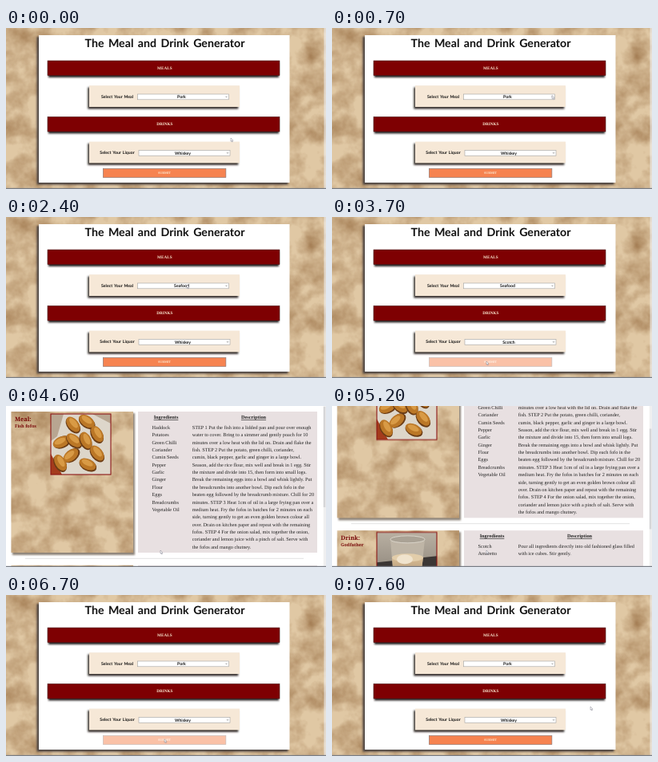
An HTML page for the animation above (8 s loop, 400 px wide and 202 px high).

```html
<!DOCTYPE html>
<html lang="en">
<head>
<meta charset="utf-8">
<title>The Meal and Drink Generator</title>
<style>
html, body { margin: 0; width: 100%; height: 100%; overflow: hidden; background: #fff; }
svg { display: block; width: 100vw; height: 100vh; }
text { text-rendering: geometricPrecision; }
.comic { font: bold 5.2px "Comic Sans MS", Lato, sans-serif; fill: #111; word-spacing: .8px; }
.title { font-size: 14.2px; word-spacing: 2px; }
.serif { font: 6.25px "Liberation Serif", serif; fill: #222; }
.head { font-weight: bold; font-size: 6.3px; text-decoration: underline; }
.bar { font-weight: bold; font-size: 5.2px; fill: #fbead2; }
.slab { font: 900 7.4px "Noto Serif", serif; fill: #780808; }
.small { font-size: 5.5px; }
.mid { text-anchor: middle; }

/* One 8 s timeline shared by every part */
.a { animation: 8s step-end infinite; }
#home { animation-name: home; }
#result { animation-name: result; }
.pick1 { animation-name: pick1; }
.pick2 { animation-name: pick2; }
.was1 { animation-name: was1; }
.was2 { animation-name: was2; }
#submit { animation-name: hover; }
#page { animation: scroll 8s linear infinite; }
#thumb { animation: thumb 8s linear infinite; }
#cursor { animation: move 8s ease-in-out infinite; }

@keyframes home { 0%, 82.5% { visibility: visible } 50% { visibility: hidden } }
@keyframes result { 0%, 82.5% { visibility: hidden } 50% { visibility: visible } }
@keyframes pick1 { 0%, 82.5% { opacity: 0 } 28.75% { opacity: 1 } }
@keyframes was1 { 0%, 82.5% { opacity: 1 } 28.75% { opacity: 0 } }
@keyframes pick2 { 0%, 82.5% { opacity: 0 } 42.5% { opacity: 1 } }
@keyframes was2 { 0%, 82.5% { opacity: 1 } 42.5% { opacity: 0 } }
@keyframes hover { 0%, 85% { opacity: 1 } 45%, 82.5% { opacity: .5 } }
@keyframes scroll {
  0%, 61.25% { transform: translateY(0) }
  71.25%, 100% { transform: translateY(-116px) }
}
@keyframes thumb {
  0%, 61.25% { transform: translateY(0) }
  71.25%, 100% { transform: translateY(73px) }
}
@keyframes move {
  0%, 1.25% { transform: translate(281px, 138px) }
  8.75%, 12.5% { transform: translate(275px, 84.5px) }
  21.25% { transform: translate(275px, 84.5px) }
  26.25%, 30% { transform: translate(226px, 85px) }
  33.75%, 38.75% { transform: translate(275px, 155px) }
  42.5% { transform: translate(226px, 157px) }
  46.25%, 72.5% { transform: translate(193px, 181px) }
  77.5%, 82.5% { transform: translate(194px, 182px) }
  92.5% { transform: translate(322px, 139px) }
  95%, 100% { transform: translate(323px, 140px) }
}
</style>
</head>
<body>
<svg viewBox="0 0 400 202" preserveAspectRatio="none">
  <defs>
    <filter id="paper" x="0" y="0" width="1" height="1" color-interpolation-filters="sRGB">
      <feTurbulence type="fractalNoise" baseFrequency=".035" numOctaves="4" seed="8"/>
      <feColorMatrix values="0 0 0 0 .56  0 0 0 0 .39  0 0 0 0 .22  1.3 0 0 0 -.45"/>
      <feComposite in2="SourceGraphic" operator="in" result="stain"/>
      <feMerge><feMergeNode in="SourceGraphic"/><feMergeNode in="stain"/></feMerge>
    </filter>
    <filter id="soft" x="-10%" y="-10%" width="120%" height="120%"><feGaussianBlur stdDeviation="1.1"/></filter>
    <linearGradient id="wall" x2="0" y2="1">
      <stop stop-color="#b9b0a2"/><stop offset="1" stop-color="#7d756c"/>
    </linearGradient>
    <linearGradient id="amber" x2="0" y2="1">
      <stop stop-color="#d8bc94"/><stop offset="1" stop-color="#a98e70"/>
    </linearGradient>
    <clipPath id="frame"><rect width="75" height="76"/></clipPath>
  </defs>

  <g id="home" class="a">
    <rect width="400" height="202" fill="#e0c8a4" filter="url(#paper)"/>
    <rect x="38.5" y="11" width="314" height="185.5" fill="#4a4340" filter="url(#soft)"/>
    <rect x="41" y="9" width="313.5" height="185" fill="#fff"/>
    <text class="comic title mid" x="198.5" y="24">The Meal and Drink Generator</text>
    <g id="blocks"></g>
    <g id="submit" class="a">
      <rect x="121.3" y="176.3" width="153.6" height="11.4" fill="#f68350" stroke="#80777a" stroke-width=".6"/>
      <text class="serif bar mid" x="198" y="183.4" style="font-size:4.1px">SUBMIT</text>
    </g>
  </g>

  <g id="result" class="a">
    <rect width="400" height="202" fill="#fff"/>
    <g id="page">
      <g id="cards"></g>
      <path d="M24 191.3H372" stroke="#d4d4d4" stroke-width=".7"/>
      <rect x="93.3" y="294.3" width="207.5" height="16" fill="#800a0c" stroke="#5c2020" stroke-width=".6"/>
      <text class="comic mid" x="197.5" y="304.2" style="fill:#fff">Go Back</text>
      <g id="food" transform="translate(56 10)" clip-path="url(#frame)">
        <rect width="75" height="76" fill="#ddd6ca"/>
        <path d="M0 0H16L8 28 0 34ZM52 0H75V12Z" fill="#b8a691"/>
        <path d="M0 50 14 76H0Z" fill="#a43b1c"/>
      </g>
      <g transform="translate(56 202)" clip-path="url(#frame)">
        <rect width="75" height="76" fill="url(#wall)"/>
        <path d="M0 38 75 30V76H0Z" fill="#3b3634"/>
        <path d="M0 58 22 76H0Z" fill="#a69a8b"/>
        <path d="M17 9 21 58Q38 69 55 58L60 9Z" fill="#c2b9aa" opacity=".85"/>
        <path d="M19 32 21 54Q38 63 55 54L58 32Z" fill="url(#amber)"/>
        <path d="M21 56Q38 66 55 56L54 63Q38 71 22 63Z" fill="#d6d2c9"/>
        <ellipse cx="38.5" cy="32" rx="19.5" ry="5" fill="#e2cdaa"/>
        <ellipse cx="35" cy="34" rx="10" ry="6" fill="#f0e3cd"/>
        <ellipse cx="38.5" cy="9" rx="21.5" ry="4.5" fill="#aaa295" stroke="#e4dfd5" stroke-width=".8"/>
      </g>
      <g fill="none" stroke="#8b1414" stroke-width="1.1">
        <rect x="56" y="10" width="75" height="76"/>
        <rect x="56" y="202" width="75" height="76"/>
      </g>
    </g>
    <rect x="396.7" width="3.3" height="202" fill="#f1f1f1"/>
    <rect id="thumb" x="397" y="1" width="2.6" height="126" fill="#bdbdc0"/>
  </g>

  <rect x="397.5" width="2.5" height="202" fill="#eeeef0" opacity=".65"/>
  <rect y="200.8" width="400" height="1.2" fill="#777c85"/>
  <g id="cursor"><path d="M0 0V4.3L1 3.4 1.7 5 2.4 4.7 1.7 3.2H3Z" fill="#fff" stroke="#667" stroke-width=".4"/></g>
</svg>
<script>
const put = (id, markup) => document.getElementById(id).insertAdjacentHTML('beforeend', markup);
const rect = (x, y, w, h, fill, more = '') =>
  `<rect x="${x}" y="${y}" width="${w}" height="${h}" fill="${fill}" ${more}/>`;
const text = (cls, x, y, s) => `<text class="${cls}" x="${x}" y="${y}">${s}</text>`;
const soft = 'filter="url(#soft)"';

// Heading bar with its select box below
function block(y, name, label, labelX, boxX, was, pick, n) {
  const mid = boxX + 55;
  return rect(53, y + 2, 288, 19, '#282020', soft)
    + rect(52, y, 290, 18.6, '#7e0002', 'stroke="#42191a" stroke-width=".5"')
    + text('serif bar mid', 198.3, y + 11, name)
    + rect(102.3, y + 33.5, 188, 27, '#352e2b', soft)
    + rect(104, y + 31.2, 188, 26.8, '#f6e8d7')
    + text('comic', labelX, y + 46.8, label)
    + rect(boxX, y + 42, 114, 6.8, '#fff', 'stroke="#a0a0a0" stroke-width=".6"')
    + text(`comic mid a was${n}`, mid, y + 47.1, was)
    + text(`comic mid a pick${n}`, mid, y + 47.1, pick)
    + `<path d="M${boxX + 110} ${y + 44.8}l1 1.1 1-1.1" fill="none" stroke="#333" stroke-width=".5"/>`;
}
put('blocks',
  block(41, 'MEALS', 'Select Your Meal', 119, 164.5, 'Pork', 'Seafood', 1) +
  block(111.4, 'DRINKS', 'Select Your Liquor', 117.3, 166, 'Whiskey', 'Scotch', 2));

const column = (x, y, lines) =>
  lines.trim().split('\n').map((s, i) => text('serif', x, y + i * 9.37, s)).join('');

// Parchment card on the left, recipe panel on the right
function card(y, h, kind, name, items, steps) {
  return rect(8, y + 2, 153, h + 1, '#8d8378', soft)
    + rect(6.5, y, 152.5, h, '#e0c8a4', 'filter="url(#paper)"')
    + rect(165, y, 224, h, '#e8e0e1')
    + text('slab', 11, y + 11.5, kind)
    + text('slab small', 11, y + 20, name)
    + text('serif head mid', 200, y + 9.2, 'Ingredients')
    + text('serif head mid', 309.5, y + 9.2, 'Description')
    + column(182.5, y + 21.8, items)
    + column(232.7, y + 21.8, steps);
}
put('cards', card(7, 177, 'Meal:', 'Fish fofos', `
Haddock
Potatoes
Green Chilli
Coriander
Cumin Seeds
Pepper
Garlic
Ginger
Flour
Eggs
Breadcrumbs
Vegetable Oil`, `
STEP 1 Put the fish into a lidded pan and pour over enough
water to cover. Bring to a simmer and gently poach for 10
minutes over a low heat with the lid on. Drain and flake the
fish. STEP 2 Put the potato, green chilli, coriander,
cumin, black pepper, garlic and ginger in a large bowl.
Season, add the rice flour, mix well and break in 1 egg. Stir
the mixture and divide into 15, then form into small logs.
Break the remaining eggs into a bowl and whisk lightly. Put
the breadcrumbs into another bowl. Dip each fofo in the
beaten egg followed by the breadcrumb mixture. Chill for 20
minutes. STEP 3 Heat 1cm of oil in a large frying pan over a
medium heat. Fry the fofos in batches for 2 minutes on each
side, turning gently to get an even golden brown colour all
over. Drain on kitchen paper and repeat with the remaining
fofos. STEP 4 For the onion salad, mix together the onion,
coriander and lemon juice with a pinch of salt. Serve with
the fofos and mango chutney.`)
  + card(199.8, 81, 'Drink:', 'Godfather', `
Scotch
Amaretto`, `
Pour all ingredients directly into old fashioned glass filled
with ice cubes. Stir gently.`));

// Fried fofos: x, y, tilt
const fofos = [[28, 13, 50], [45, 9, 35], [58, 25, 60], [13, 35, -25], [29, 33, 40],
  [44, 33, 65], [25, 52, -40], [58, 49, 50], [46, 63, 25], [12, 61, 60]];
put('food', fofos.map(([x, y, tilt]) =>
  `<g transform="translate(${x} ${y}) rotate(${tilt})">
    <ellipse cx="1" cy="1" rx="11.5" ry="7.2" fill="#6b3c15"/>
    <ellipse rx="11" ry="6.6" fill="#bb7726"/>
    <ellipse cx="-1" cy="-1.5" rx="7.5" ry="3.4" fill="#d89a45"/>
  </g>`).join(''));
</script>
</body>
</html>
```
